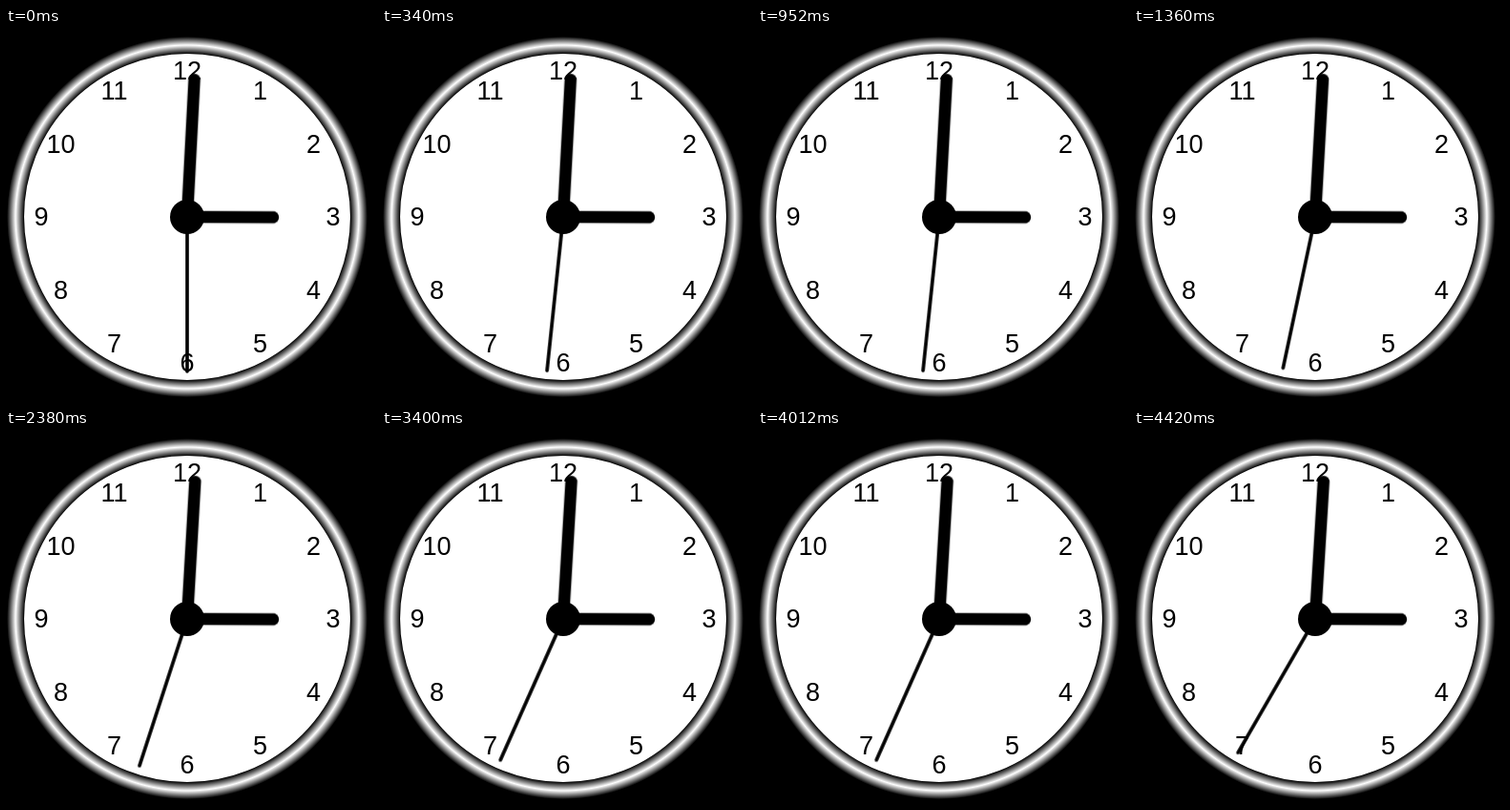
Write an HTML page that moves like this. It is 388x392 px and loops after 4760 ms.

```html
<!DOCTYPE html>
<html lang="en">
<head>
<meta charset="utf-8">
<title>Clock</title>
<style>
  html, body { margin: 0; width: 100%; height: 100%; overflow: hidden; background: #000; }
  svg { display: block; }
  text { font: 27px Arial, "Liberation Sans", sans-serif; text-anchor: middle; }
  line { stroke: #000; stroke-linecap: round; }
</style>
</head>
<body>
<svg width="388" height="392" viewBox="0 0 388 392">
  <defs>
    <radialGradient id="rim" gradientUnits="userSpaceOnUse" cx="0" cy="0" r="189">
      <stop offset=".90476" stop-color="#000"/>
      <stop offset=".95238" stop-color="#fff"/>
      <stop offset="1" stop-color="#000"/>
    </radialGradient>
  </defs>
  <g transform="translate(190 198)">
    <circle r="180" fill="#fff"/>
    <circle r="180" fill="none" stroke="url(#rim)" stroke-width="18"/>
    <circle r="18"/>
    <g id="numbers"></g>
    <line id="hour" y2="-90" stroke-width="12.6"/>
    <line id="minute" y2="-144" stroke-width="12.6"/>
    <line id="second" y2="-162" stroke-width="3.6"/>
  </g>
</svg>
<script>
const LOOP = 4760, FIRST = 340, TICK = 1020;
const START = 30, TICKS = 5;   // seconds after three o'clock
const $ = id => document.getElementById(id);

for (let n = 1; n <= 12; n++) {
  const a = n * Math.PI / 6;
  const label = document.createElementNS('http://www.w3.org/2000/svg', 'text');
  label.setAttribute('x', 153 * Math.sin(a));
  label.setAttribute('y', 9.4 - 153 * Math.cos(a));
  label.textContent = n;
  $('numbers').append(label);
}

// Each hand jumps to its new angle once per tick.
function run(id, angle) {
  const step = (time, s) => ({
    offset: time / LOOP,
    transform: `rotate(${angle(s)}deg)`,
    easing: 'step-end'
  });
  const frames = [step(0, START)];
  for (let k = 1; k <= TICKS; k++) {
    frames.push(step(FIRST + (k - 1) * TICK, START + k));
  }
  frames.push(step(LOOP, START + TICKS));
  $(id).animate(frames, { duration: LOOP, iterations: Infinity });
}

run('hour', s => 90 + s / 120);
run('minute', s => s / 10);
run('second', s => s * 6);
</script>
</body>
</html>
```
